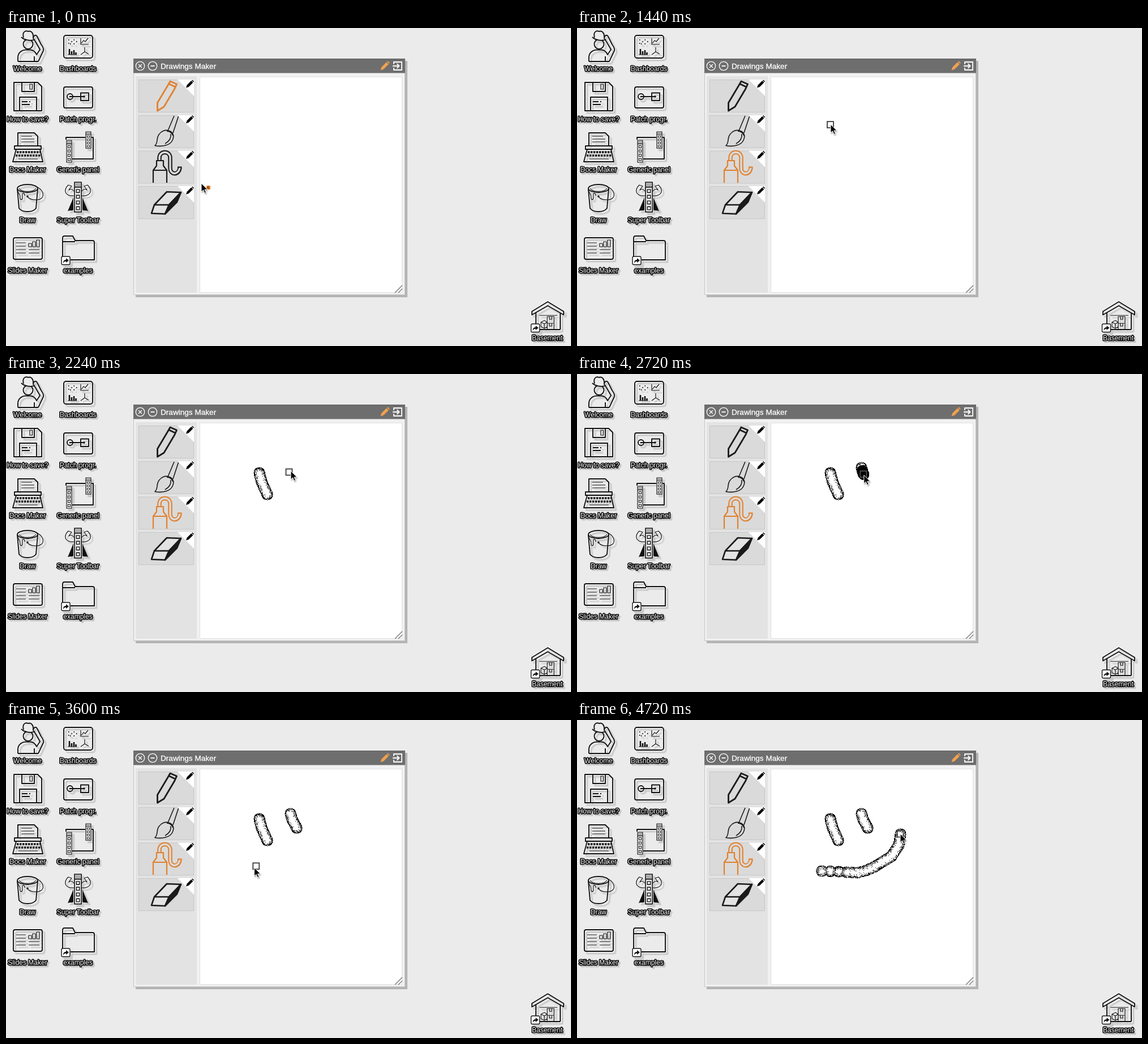
These frames come from a looping animation (998 px wide and 561 px high, 4.8 s). An HTML page with a canvas:

```html
<!DOCTYPE html>
<html lang="en">
<head>
<meta charset="utf-8">
<title>Drawings Maker</title>
<style>
html, body { margin: 0; width: 100%; height: 100%; overflow: hidden; background: #ebebeb; }
svg, canvas { position: absolute; left: 0; top: 0; display: block; }
text { font-family: "Liberation Sans", Arial, sans-serif; }
.icons { fill: none; stroke: #111; stroke-width: 1.9; stroke-linejoin: round;
  filter: drop-shadow(0 0 1px #fff) drop-shadow(4px 4px 0 rgba(0,0,0,.15)); }
.thin { stroke-width: 1.2; }
.solid { fill: #111; stroke: none; }
.labels { font-size: 12px; text-anchor: middle; fill: #fff; stroke: #000; stroke-width: 3.2;
  stroke-linejoin: round; paint-order: stroke; filter: drop-shadow(3px 3px 0 rgba(0,0,0,.15)); }
.tool { fill: none; stroke: currentColor; stroke-width: 2.6; stroke-linejoin: round; color: #1a1a1a; }
.tool.on { color: #e0812f; }
</style>
</head>
<body>
<svg width="998" height="561" viewBox="0 0 998 561">
  <defs>
    <path id="pen" d="M-6.500 6.500L-5 1.800L2.700-5.900L5.900-2.700L-1.800 5Z M3.500-6.600L4.800-7.600L7.600-4.800L6.600-3.500Z"/>
    <g id="link">
      <rect x="0" y="0" width="15" height="14.500" rx="2" fill="#fff" stroke-width="1.400"/>
      <path d="M3 12C3 7.500 5 6 8 6V3L13 7L8 11V8.500C6 8.500 4.500 9 3 12Z" class="solid"/>
    </g>
    <g id="strip" class="thin">
      <rect x="0" y="0" width="9" height="39" fill="#ebebeb"/>
      <rect x="1" y="1" width="7" height="5" fill="#aaa" stroke="none"/>
      <path d="M0 6.500H9"/>
      <path d="M4.500 9V38" stroke-width="5" stroke-dasharray="5 2.500"/>
      <path d="M4.500 10V37" stroke="#eee" stroke-width="3" stroke-dasharray="3 4.500"/>
    </g>
  </defs>

  <g class="icons">
    <!-- welcome -->
    <circle cx="39" cy="28.500" r="8.500"/>
    <path d="M21 59V52C21 44 27 39 35 38.500H43C49 39 52 42 54 47L60 38L52 24L48 18M21 59H57M50 59V50M57 59L66 40C67 36 65 33 62 29L55 15C53 11 48 13 48 18"/>
    <path d="M27 16C32 21 44 24 51 20M31 17C28 6 35 4 39 6C44 4 49 8 48 19" fill="#ebebeb"/>
    <!-- dashboards -->
    <rect x="102" y="13" width="51" height="40" rx="4"/>
    <g class="thin">
      <path d="M110 21h1.500m4 3h1.500m-4 4h1.500m5-7h1.500m3 3h1.500m-6 4h1.500m-11-1h1.500" stroke-width="2"/>
      <path d="M132 18V29H146M133 27L137 22L140 24L145 18M109 47H125M139 34V42L132 47M139 42L146 46"/>
      <path d="M112 47V37M116 47V41M120 47V39M123.500 47V43" stroke-width="2.600"/>
    </g>
    <!-- floppy -->
    <path d="M14 96H56L63 103V146H14ZM28 96V112H50V96M24 146V122H54V146"/>
    <path d="M42 99H46.500V108H42Z" class="thin"/>
    <path d="M28 130H38M41 130H43M28 135H42" stroke-width="2.200"/>
    <!-- patch -->
    <rect x="102" y="104" width="51" height="37" rx="3"/>
    <circle cx="113" cy="121" r="5"/>
    <path d="M113 121H138M132 114.500H146V128H132Z"/>
    <circle cx="113" cy="121" r="1.300" class="solid"/><circle cx="138" cy="121" r="1.800" class="solid"/>
    <!-- typewriter -->
    <path d="M21 208V185H50L56 191V208M15 208H62V214H15ZM18 214L12 236H65L60 214"/>
    <path d="M27 191H46M27 196H50M27 201H50M22 231H56" class="thin"/>
    <path d="M19 219H60M17 225H61" stroke-width="3.500" stroke-dasharray="3.500 1.500"/>
    <!-- panel -->
    <path d="M117 231H154V193H151M140 193H106V197"/>
    <use href="#strip" x="107" y="198"/>
    <use href="#strip" transform="translate(141 183) scale(1 .75)"/>
    <!-- bucket -->
    <ellipse cx="38" cy="283" rx="18" ry="7"/>
    <path d="M20 284L23 318C29 326 47 326 53 318L56 284"/>
    <path d="M20 284C21 294 25 290 25 300C25 304 29 304 29 299V293C30 290 33 291 33 296M23 283C28 290 48 290 53 283M56 281C65 286 68 295 63 300C57 305 44 304 38 298" class="thin"/>
    <circle cx="38" cy="297" r="1.800" class="solid"/>
    <!-- super toolbar -->
    <path d="M119 299L109 323C113 321 116 323 119 321ZM135 299L145 323C141 321 138 323 135 321Z" class="solid"/>
    <path d="M120 296C113 297 106 294 105 289C104 285 107 280 110 277L116 279L113 283L111 286C115 283 118 285 120 288M134 296C141 297 148 294 149 289C150 285 147 280 144 277L138 279L141 283L143 286C139 283 136 285 134 288" class="thin"/>
    <use href="#strip" transform="translate(121 272) scale(1.350)"/>
    <!-- slides -->
    <rect x="13" y="370" width="51" height="38" rx="3"/>
    <path d="M18 379H35M18 385H35M18 391H35M18 397H35M40 391H59M40 397H59M40 386V380H45V386ZM47 386V377H52V386ZM54 386V374H59V386Z" class="thin"/>
    <!-- folder -->
    <path d="M100 409V371C100 368 101 367 103 367H118L122 375H153C155 375 156 376 156 378V409H114M100 377H122"/>
    <use href="#link" x="98" y="403"/>
    <!-- basement -->
    <path d="M929 506V500L957 483L985 500V506L957 490ZM936 502V524M979 502V532M942 532H979"/>
    <path d="M956 509H968V521H956ZM956 521H968V532H956ZM960 509V514H964V509M960 521V526H964V521M945 519L951 516L956 519V527L951 530L945 527ZM945 519L951 522L956 519M951 522V530M942 507H974" class="thin"/>
    <use href="#link" x="927.500" y="522"/>
  </g>
  <g id="labels" class="labels"></g>

  <!-- window -->
  <path d="M229 58H709V475H229Z" fill="#b4b4b4"/>
  <path d="M225 54H705V471H225Z" fill="#f1f1f1"/>
  <path d="M225.500 79V470.500H704.500V79" fill="none" stroke="#c4c4c4"/>
  <path d="M225 54H705V79.500H225Z" fill="#6e6e6e"/>
  <path d="M225 54.500H705" stroke="#5c5c5c"/>
  <g fill="none" stroke="#fff" stroke-width="1.300">
    <circle cx="237" cy="67" r="7.700"/><circle cx="259" cy="67" r="7.700"/>
    <path d="M234 64L240 70M240 64L234 70"/>
    <path d="M255.500 67H262.500" stroke-width="1.800"/>
    <path d="M685 64V60H699V74H685V70M683 67H694M690.500 63L694.500 67L690.500 71" stroke-width="1.800"/>
  </g>
  <text x="273" y="72" font-size="13.600" fill="#fff" stroke="#fff" stroke-width=".3">Drawings Maker</text>
  <use href="#pen" transform="translate(669 67) scale(1.150)" fill="#efa14f"/>
  <path d="M229 85H337V467H229Z" fill="#e3e3e3"/>
  <path d="M342.500 86.500H699.500V466.500H342.500Z" fill="#fff" stroke="#c9c9c9" stroke-dasharray="1 1"/>
  <path d="M687 467L700 454M693 467L700 460" stroke="#777" stroke-width="1.400"/>
  <g id="buttons"></g>

  <g id="pencil" class="tool">
    <path d="M290 94L301.500 99L298 107L279 139L267.500 146L267.500 132L286 101ZM287.500 98.500L299 104" stroke-width="2.800"/>
  </g>
  <g class="tool" style="stroke-width:1.600">
    <path d="M263 207.500C269 203 265 195 270 188C274 182 281 179 287 181C295 183 298 190 294 198C290 207 276 210 263 207.500ZM286 181L297 155M295 185L304.500 156M284 182C289 182 293 185 295 190M291 187C292 194 288 200 281 204"/>
  </g>
  <g id="glue" class="tool">
    <path d="M271 236V229C271 216 290 216 290 229V247C290 260 306 260 307 246" stroke-width="7.500"/>
    <path d="M271 236V229C271 216 290 216 290 229V247C290 260 306 260 307 245" style="stroke:#dadada;stroke-width:3.400"/>
    <path d="M303 245.500H310.500" stroke-width="2.200"/>
    <path d="M260 273V251L266 243V234H278V243L284 251V273M260 251H284" fill="#dadada" stroke-width="2.200"/>
  </g>
  <g class="tool">
    <path d="M262 312L284 289L309 290L288 312ZM262 312L257 327L281 328L288 312" fill="#e3e3e3"/>
    <path d="M288 312L309 290L302 307L281 328Z" fill="#1a1a1a"/>
  </g>
</svg>

<canvas id="paint" width="998" height="561"></canvas>

<svg width="998" height="561" viewBox="0 0 998 561">
  <rect id="nib" x="-5.500" y="-5.500" width="11" height="11" fill="none" stroke="#4c4c4c" stroke-width="2"/>
  <circle id="ring" r="22.500" fill="none" stroke="#111" stroke-width="1.600"/>
  <g id="cursor">
    <g id="badge">
      <rect x="9" y="4" width="7" height="7" rx="1.500" fill="#e0812f"/>
      <path d="M13.800 6.300H11.200V8.800H13.800" fill="none" stroke="#5a3000"/>
    </g>
    <path d="M0 0V15L3.500 11.800L6 17.500L8.500 16.400L6 11H11Z" fill="#000" stroke="#fff"
      style="filter:drop-shadow(1px 2px 1px rgba(0,0,0,.35))"/>
  </g>
</svg>

<script>
const $ = id => document.getElementById(id);
const LOOP = 4800, STEP = 80, LAG = 40, HOLD = 220, R = 10;

const names = ["Welcome", "Dashboards", "How to save?", "Patch progr.", "Docs Maker",
  "Generic panel", "Draw", "Super Toolbar", "Slides Maker", "examples"];
const label = (s, x, y) => `<text x="${x}" y="${y}">${s}</text>`;
$("labels").innerHTML = names.map((s, i) =>
  label(s, 38 + 89 * (i % 2), 76 + 89 * (i >> 1))).join("") + label("Basement", 956, 551);

$("buttons").innerHTML = [0, 1, 2, 3].map(i => `<g transform="translate(234 ${91 + 62.7 * i})">
  <rect x=".5" y=".5" width="97" height="57" fill="#dadada" stroke="#c6c6c6"/>
  <path d="M69 0H98V29Z" fill="#fff"/><use href="#pen" x="90.500" y="8"/></g>`).join("");

// Pointer path: time, x, y
const path = [
  [0, 345, 274], [240, 292, 250], [480, 284, 246], [560, 330, 236], [640, 410, 196],
  [720, 497, 154], [760, 523, 146], [800, 540, 141], [880, 548, 140], [1040, 510, 150],
  [1200, 465, 162], [1360, 447, 171], [1440, 448, 170], [1480, 447, 174], [1700, 451, 190],
  [1900, 461, 212], [2000, 461, 212], [2160, 494, 178], [2200, 500, 173], [2240, 503, 171],
  [2320, 502, 165], [2400, 502, 165], [2640, 505, 175], [3000, 513, 190], [3120, 513, 190],
  [3280, 490, 220], [3520, 445, 255], [3680, 432, 266], [3880, 432, 266], [3960, 462, 267],
  [4000, 476, 268], [4040, 495, 269], [4080, 510, 265], [4120, 524, 259], [4280, 555, 240],
  [4400, 568, 220], [4480, 571, 201], [4800, 571, 201]
];

function pos(t) {
  t = Math.max(0, t);
  const i = Math.max(1, path.findIndex(p => p[0] > t));
  const [a, ax, ay] = path[i - 1], [b, bx, by] = path[i];
  const k = (t - a) / (b - a);
  return [ax + (bx - ax) * k, ay + (by - ay) * k];
}

// Each stroke: start, end, time between stamps
const strokes = [[1480, 1900, 20], [2400, 3000, 20], [3880, 4000, 40], [4020, 4480, 20]];
const presses = [400, 1480, 2400, 3880];
const stamps = [];
for (const [from, to, gap] of strokes)
  for (let t = from; t <= to; t += gap) stamps.push([t, ...pos(t)]);

const ctx = $("paint").getContext("2d");
const box = { x: 415, y: 148, w: 175, h: 138 };

function grain(x, y) {
  const v = Math.sin(x * 12.9898 + y * 78.233) * 43758.5453;
  const check = (x + y) % 2 ? 0.25 : 0.75;
  return 0.5 * (v - Math.floor(v)) + 0.5 * check;
}

// Fresh paste is black, then settles into a speckled tube with a white core.
function paint(t) {
  const img = ctx.createImageData(box.w, box.h);
  const live = stamps.filter(s => s[0] + LAG <= t);
  for (let y = 0; y < box.h; y++) for (let x = 0; x < box.w; x++) {
    const px = x + box.x, py = y + box.y;
    let near = 99, fresh = false;
    for (const [born, sx, sy] of live) {
      const d = Math.hypot(px - sx, py - sy);
      if (d > R) continue;
      near = Math.min(near, d);
      if (t - born < HOLD) fresh = true;
    }
    if (near > R) continue;
    const dark = fresh || near > 9.2 || (near - 1.5) / 11.5 > grain(px, py);
    const o = 4 * (y * box.w + x);
    img.data[o] = img.data[o + 1] = img.data[o + 2] = dark ? 0 : 255;
    img.data[o + 3] = 255;
  }
  ctx.putImageData(img, box.x, box.y);
}

const move = (el, [x, y]) => el.setAttribute("transform", `translate(${x} ${y})`);
const show = (el, on) => el.setAttribute("visibility", on ? "visible" : "hidden");

function draw(t) {
  const tip = pos(t), nib = pos(t - LAG);
  const gluing = t >= 400;
  $("pencil").classList.toggle("on", !gluing);
  $("glue").classList.toggle("on", gluing);
  move($("cursor"), tip);
  move($("ring"), tip);
  move($("nib"), nib);
  show($("badge"), !gluing && tip[0] > 335);
  show($("nib"), gluing && nib[0] > 342);
  show($("ring"), presses.some(p => t >= p && t < p + 240));
  paint(t);
}

const start = performance.now();
let last = -1;
function tick() {
  const t = Math.floor((performance.now() - start) % LOOP / STEP) * STEP;
  if (t !== last) draw(last = t);
  requestAnimationFrame(tick);
}
tick();
</script>
</body>
</html>
```
